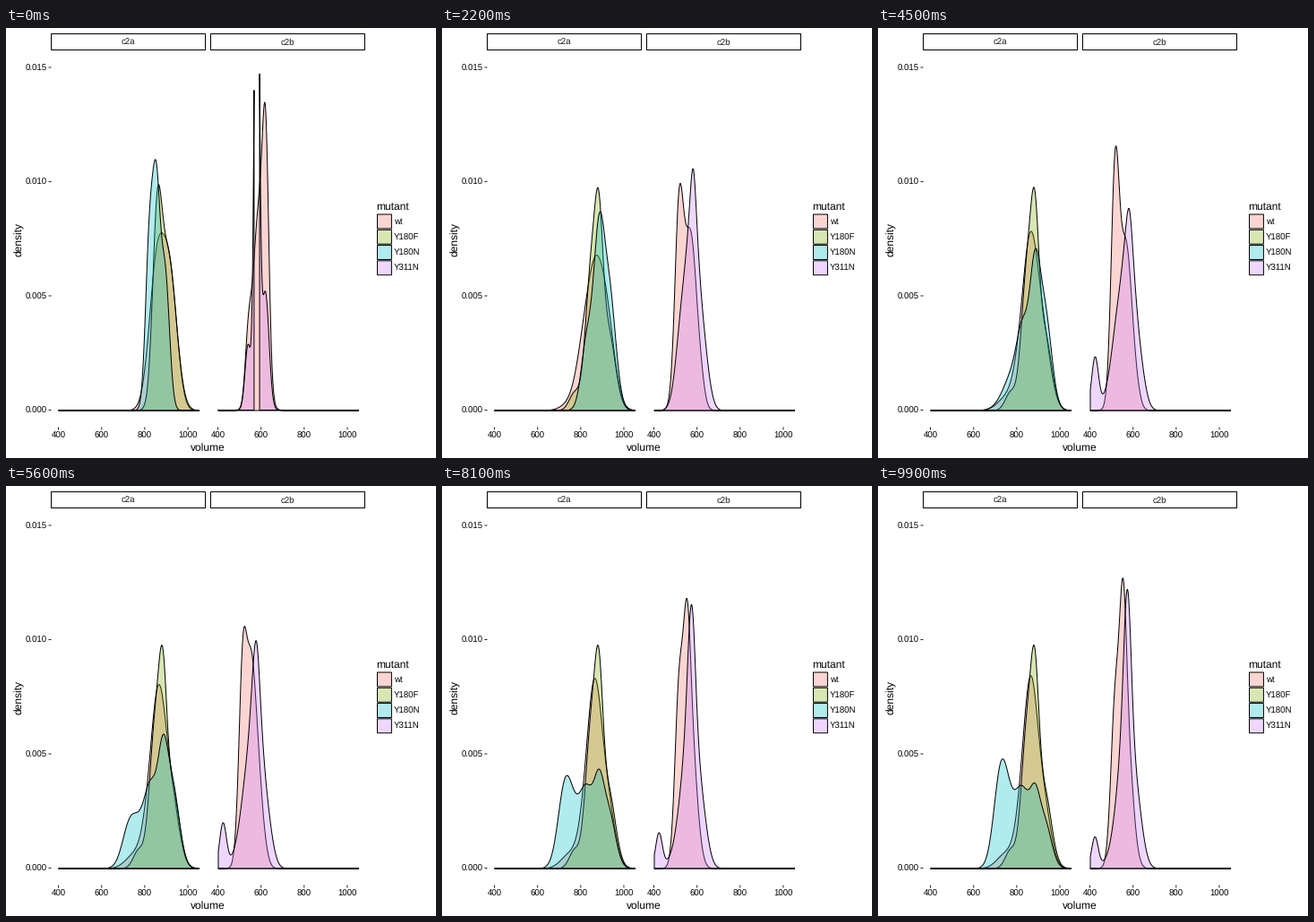
A matplotlib script for the animation above (10000 ms loop, 480 px wide and 480 px high).

```python
import numpy as np
import matplotlib.pyplot as plt
from matplotlib.animation import FuncAnimation
from matplotlib.collections import PolyCollection
from matplotlib.patches import Rectangle

SIZE, DPI = 480, 80
FRAMES, INTERVAL = 100, 100
PX = 72 / DPI                       # points per pixel
Y_MAX = 0.015
LEFT = {"c2a": 58.5, "c2b": 236.5}  # pixel of volume 400 in each panel
X_SCALE, Y_SCALE, BASE = 0.2408, 25500, 426.5
COLORS = {"wt": "#F8766D", "Y180F": "#7CAE00",
          "Y180N": "#00BFC4", "Y311N": "#C77CFF"}

volume = np.linspace(400, 1050, 512)


def normal(centre, width, share):
    z = (volume - centre) / width
    return share * np.exp(-z * z / 2) / (width * np.sqrt(2 * np.pi))


class Track:
    """A simulated volume that moves through stays, each ending at a count.

    A stay draws its samples from normals (centre, width, share); the density
    at a count is the average over all samples collected so far.
    """

    def __init__(self, panel, name, stays):
        self.panel, self.name = panel, name
        self.ends = np.array(list(stays))
        self.starts = np.concatenate([[0], self.ends[:-1]])
        self.shapes = np.array([sum(normal(*n) for n in normals)
                                for normals in stays.values()])

    def density(self, count):
        spent = np.clip(count, self.starts, self.ends) - self.starts
        return spent @ self.shapes / count


tracks = [
    Track("c2a", "wt", {
        1: [(858, 37, .62), (920, 32, .38)],
        15: [(815, 38, .37), (905, 42, .63)],
        100: [(865, 31, .60), (825, 30, .15), (925, 32, .18), (745, 40, .07)]}),
    Track("c2a", "Y180F", {
        1: [(855, 21, .35), (905, 38, .65)],
        100: [(845, 26, .38), (882, 19, .29), (925, 33, .28), (770, 25, .05)]}),
    Track("c2a", "Y180N", {
        1: [(819, 18, .31), (852, 18, .40), (893, 20, .29)],
        36: [(882, 23, .36), (928, 31, .43), (830, 28, .21)],
        46: [(790, 50, 1)],
        100: [(726, 33, .62), (810, 45, .38)]}),
    Track("c2b", "wt", {
        1: [(620, 14.5, .31), (588, 28, .61), (538, 14, .08)],
        15: [(514, 22, .38), (570, 30, .62)],
        46: [(515, 18, .52), (563, 28, .48)],
        100: [(552, 17, .67), (513, 21, .21), (588, 18, .12)]}),
    Track("c2b", "Y311N", {
        1: [(580.5, 11, .72), (540, 14, .10), (620, 17, .22)],
        32: [(580, 23, .42), (535, 30, .36), (622, 28, .22)],
        46: [(422, 16, .30), (575, 35, .45), (500, 35, .25)],
        100: [(571, 17, .46), (548, 26, .26), (605, 30, .26), (420, 14, .02)]}),
]


def areas(panel, d):
    """Closed pixel polygons, split where the density leaves the scale."""
    x = LEFT[panel] + (volume - 400) * X_SCALE
    y = BASE - d * Y_SCALE
    inside = np.flatnonzero(d <= Y_MAX)
    runs = np.split(inside, np.flatnonzero(np.diff(inside) > 1) + 1)
    return [np.vstack([[x[r[0]], BASE], np.column_stack([x[r], y[r]]),
                       [x[r[-1]], BASE]]) for r in runs]


plt.rcParams.update({"font.family": "Liberation Sans", "text.hinting": "none"})
fig = plt.figure(figsize=(SIZE / DPI, SIZE / DPI), dpi=DPI, facecolor="white")
ax = fig.add_axes([0, 0, 1, 1])
ax.set(xlim=(0, SIZE), ylim=(SIZE, 0))
ax.axis("off")


def label(x, y, text, size=9.6, ha="center", va="baseline", **kw):
    ax.text(x, y, text, fontsize=size * PX, ha=ha, va=va, **kw)


def box(x, y, w, h, fill="white"):
    ax.add_patch(Rectangle((x, y), w, h, fc=fill, ec="black", lw=PX,
                           snap=False))


def tick(xs, ys):
    ax.plot(xs, ys, color="#222222", lw=PX, solid_capstyle="butt", snap=False)


for panel, x0 in LEFT.items():
    box(x0 - 8, 6.5, 172, 18)
    label(x0 + 78, 19, panel, color="#1a1a1a")
    for v in (400, 600, 800, 1000):
        x = x0 + (v - 400) * X_SCALE
        tick([x, x], [445.5, 448.5])
        label(x, 458, str(v))

for v in (0, 0.005, 0.01, 0.015):
    y = BASE - v * Y_SCALE
    tick([47.5, 50.5], [y, y])
    label(46, y + 3.5, f"{v:.3f}", ha="right")

label(225.7, 472, "volume", 12)
label(14.5, 235.5, "density", 12, va="center", rotation=90)

label(413.5, 203, "mutant", 12, ha="left")
for i, (name, color) in enumerate(COLORS.items()):
    y = 208 + 17.28 * i
    box(414.5, y, 15.9, 15.9, (color, 0.3))
    label(433, y + 11.3, name, ha="left")

polys = []
for i, track in enumerate(tracks):
    poly = PolyCollection([], facecolors=[(COLORS[track.name], 0.3)],
                          edgecolors="black", linewidths=PX, zorder=3 + i)
    ax.add_collection(poly, autolim=False)
    polys.append(poly)


def draw(frame):
    for poly, track in zip(polys, tracks):
        poly.set_verts(areas(track.panel, track.density(frame + 1)))
    return polys


anim = FuncAnimation(fig, draw, frames=FRAMES, interval=INTERVAL,
                     repeat=True, repeat_delay=0)
plt.show()
```
